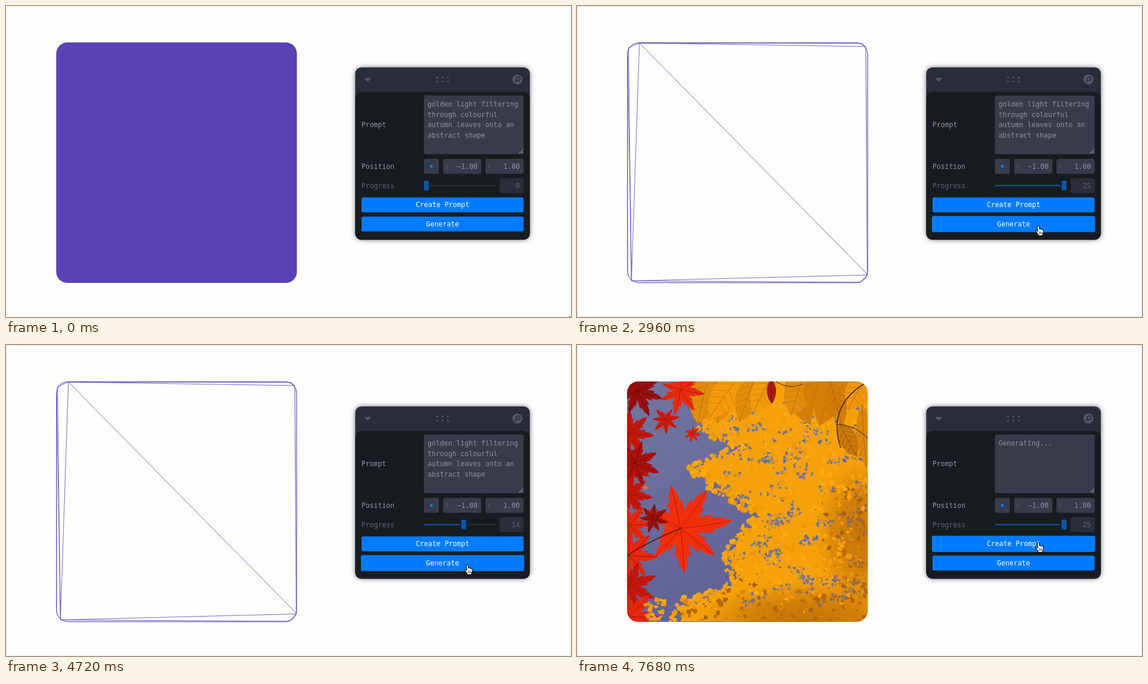
Animation, 960 px wide and 529 px high, one loop 8 s. Source, as an HTML page with a canvas:

```html
<!DOCTYPE html>
<html lang="en">
<head>
<meta charset="utf-8">
<title>Prompt panel</title>
<style>
  html, body { margin: 0; width: 100%; height: 100%; overflow: hidden; background: #fefefe; }
  #stage { position: absolute; left: 0; top: 0; width: 960px; height: 529px; overflow: hidden; }
  canvas { position: absolute; left: 85px; top: 62px; border-radius: 19px; }
  svg { position: absolute; left: 0; top: 0; }
  text { font: 11.64px "DejaVu Sans Mono", Menlo, monospace; fill: #8c92a4; white-space: pre; }
  .end { text-anchor: end; }
  .mid { text-anchor: middle; fill: #fefefe; }
  .tag { font-size: 9.5px; fill: #535760; }
  .field { fill: #383b49; }
  .grey { fill: #535760; }
  .blue { fill: #007bff; }
  .panel { filter: drop-shadow(0 0 4.5px rgba(0, 0, 0, .55)); }
</style>
</head>
<body>
<div id="stage">
  <canvas id="feathers" width="409" height="409"></canvas>
  <canvas id="leaves" width="409" height="409"></canvas>
  <svg width="960" height="529" viewBox="0 0 960 529">
    <rect id="frame" x=".5" y=".5" width="959" height="528" fill="none" stroke="#e5e5e5"/>
    <rect id="block" x="85.3" y="62" width="409" height="409" rx="19" fill="#5a42b5"/>
    <g id="wire" fill="none" stroke="#5146b0" stroke-width=".8">
      <rect x="85.5" y="62.3" width="408.6" height="408.6" rx="20"/>
      <rect x="86.3" y="63" width="406.8" height="407" rx="19" stroke-width=".6"/>
      <path d="M106 63L494 457" stroke="#4c4796"/>
      <path d="M106 63L92.5 467.5L493.5 457.5L481 470L92.5 467.5L87.5 71L106 63L490.5 69L493.5 457.5M106 63L484 63.5L490.5 69M86 85L92.5 467.5"/>
    </g>

    <rect class="panel" x="593.4" y="104.4" width="296.7" height="293.2" rx="10.5" fill="#292d39"/>
    <rect x="593.4" y="146" width="296.7" height="251.6" rx="10.5" fill="#181c20"/>
    <path class="grey" d="M610 122.2h9q1.6 .4 .6 1.8l-4 4q-1.1 .8-2.2 0l-4-4q-1-1.4 .6-1.8z"/>
    <g id="dots" class="grey"></g>
    <circle class="grey" cx="869" cy="125" r="8.6"/>
    <path d="M868 126L864.8 129.2" stroke="#292d39" stroke-width="2" stroke-linecap="round"/>
    <circle cx="870.3" cy="123.8" r="3.2" fill="none" stroke="#292d39" stroke-width="1.8"/>

    <text x="604" y="206.3">Prompt</text>
    <rect class="field" x="710" y="152.2" width="169.5" height="99.8" rx="3.2"/>
    <g id="prompt"></g>
    <path d="M872 251L878.6 244.4M876 251L878.6 248.4" stroke="#d5d6da" stroke-width=".9"/>

    <text x="604" y="276.8">Position</text>
    <rect class="field" x="710" y="260" width="25.4" height="25.4" rx="3.2"/>
    <circle class="blue" cx="722.6" cy="272.7" r="2.5"/>
    <rect class="field" x="742.6" y="260" width="65" height="25.4" rx="3.2"/>
    <rect class="field" x="814.7" y="260" width="64.8" height="25.4" rx="3.2"/>
    <text x="746" y="276" class="tag">X</text>
    <text x="818" y="276" class="tag">Y</text>
    <text x="801.2" y="276.8" class="end">−1.00</text>
    <text x="873" y="276.8" class="end">1.00</text>

    <g opacity=".6">
      <text x="604" y="309.8">Progress</text>
      <rect class="field" x="710" y="304.4" width="122" height="2.1" rx="1"/>
      <rect id="fill" class="blue" x="710" y="304.4" height="2.1" rx="1"/>
      <rect id="knob" class="blue" y="296" width="10.4" height="18.8" rx="3" stroke="#181c20" stroke-width="2"/>
      <rect class="field" x="838.8" y="292.8" width="40.7" height="25.4" rx="3.2"/>
      <text id="count" x="873" y="309.8" class="end"></text>
    </g>

    <rect id="create" class="blue" rx="3.2"/>
    <rect id="generate" class="blue" rx="3.2"/>
    <text x="741.7" y="342.4" class="mid">Create Prompt</text>
    <text x="741.7" y="375.3" class="mid">Generate</text>

    <g id="cursor">
      <g id="hand" stroke="#111" stroke-width="1.1" stroke-linejoin="round">
        <path fill="#fff" d="M-1.7 .2C-1.9-1.7 1-1.9 1.2 0L1.9 4.6C2.5 3.4 4.2 3.8 4.4 5C5.2 4 6.6 4.6 6.8 5.8C7.8 5.2 8.4 6 8.4 7L8.2 10.5L7 13.5V15.5H-.2V13.8L-3.6 9.6C-5.4 7.4-4.2 6-2.4 7.2L-1 8.6Z"/>
        <path d="M1.6 9.2V13M3.6 9.2V13M5.5 9.2V13" stroke-width=".8"/>
      </g>
      <path id="arrow" d="M0 0V14.5L3.3 11.5L5.5 16.6L7.8 15.6L5.6 10.7H10.2Z" fill="#000" stroke="#fff"/>
    </g>
  </svg>
</div>
<script>
const $ = id => document.getElementById(id);
const TAU = Math.PI * 2;
const clamp = v => Math.min(1, Math.max(0, v));
const smooth = v => (v = clamp(v), v * v * (3 - 2 * v));

let seed = 1;
const rnd = () => {
  seed = (seed * 16807) % 2147483647;
  return seed / 2147483647;
};
const span = (a, b) => a + rnd() * (b - a);
const pick = list => list[Math.floor(rnd() * list.length)];

function shape(c, color, pts) {
  c.beginPath();
  for (const [x, y] of pts) c.lineTo(x, y);
  c.closePath();
  c.fillStyle = color;
  c.fill();
}

function speck(c, x, y, r, color) {
  const pts = [];
  for (let a = 0; a < TAU; a += TAU / 7) {
    const d = r * span(.5, 1.3);
    pts.push([x + d * Math.cos(a), y + d * Math.sin(a)]);
  }
  shape(c, color, pts);
}

function soft(c, x, y, rx, ry, rgb, alpha = 1) {
  c.save();
  c.translate(x, y);
  c.scale(rx, ry);
  const g = c.createRadialGradient(0, 0, 0, 0, 0, 1);
  g.addColorStop(0, `rgba(${rgb},${alpha})`);
  g.addColorStop(.5, `rgba(${rgb},${alpha * .7})`);
  g.addColorStop(1, `rgba(${rgb},0)`);
  c.fillStyle = g;
  c.fillRect(-1, -1, 2, 2);
  c.restore();
}

function curve(c, color, width, x, y, cx, cy, x2, y2) {
  c.strokeStyle = color;
  c.lineWidth = width;
  c.beginPath();
  c.moveTo(x, y);
  c.quadraticCurveTo(cx, cy, x2, y2);
  c.stroke();
}

// Pointed leaf with ribs, growing from x,y along an angle.
function leaf(c, x, y, len, w, angle, color, rib) {
  c.save();
  c.translate(x, y);
  c.rotate(angle);
  c.beginPath();
  c.moveTo(0, 0);
  c.bezierCurveTo(len * .3, -w, len * .75, -w * .7, len, 0);
  c.bezierCurveTo(len * .75, w * .7, len * .3, w, 0, 0);
  c.fillStyle = color;
  c.fill();
  c.clip();
  curve(c, rib, .9, 0, 0, len / 2, 2, len, 0);
  for (let d = .1; d < .8; d += .14) for (const s of [-1, 1]) {
    curve(c, rib, .5, len * d, 0, len * (d + .1), s * w * .3, len * (d + .25), s * w);
  }
  c.restore();
}

// Seven toothed lobes around a centre, the longest along the angle.
function maple(c, x, y, r, angle, color, vein = '#8e1808') {
  const pts = [], tips = [];
  const at = (a, d) => [x + d * Math.cos(a), y + d * Math.sin(a)];
  for (let i = -3; i <= 3; i++) {
    const a = angle + i * .82;
    const len = r * (1 - .07 * Math.abs(i)) * span(.9, 1.05);
    for (const [turn, d] of [[-.41, .4], [-.27, .68], [-.2, .6], [-.12, .8], [0, 1], [.12, .8], [.2, .6], [.27, .68]]) {
      pts.push(at(a + turn, len * d));
    }
    tips.push(at(a, len * .95));
  }
  shape(c, color, pts);
  for (const [tx, ty] of tips) curve(c, vein, .8, x, y, (x + tx) / 2 + 2, (y + ty) / 2 + 2, tx, ty);
}

// Region between two height functions.
function band(c, color, low, high, rough = 0) {
  const a = [], b = [];
  for (let u = -4; u <= 214; u += 2) {
    a.push([u, low(u) + span(-rough, rough)]);
    b.unshift([u, high(u) + span(-rough, rough)]);
  }
  shape(c, color, a.concat(b));
}

const rim = u => 26 + 45 * Math.exp(-Math.abs(u) / 24) + 46 * smooth((u - 105) / 110);
const crest = u => 104 + 100 * Math.exp(-Math.abs(u) / 26) - 22 * smooth((u - 115) / 60);

// One quadrant, measured outwards from the mirror axes.
function feather(c) {
  seed = 77;
  c.fillStyle = '#4a250a';
  c.fillRect(0, 0, 212, 207);
  soft(c, 60, 195, 90, 32, '150,84,14', .8);
  soft(c, 150, 195, 60, 14, '150,50,14', .7);
  soft(c, 120, 172, 90, 18, '24,14,6', .85);
  soft(c, 165, 112, 85, 42, '14,10,5');
  soft(c, 150, 80, 40, 16, '66,78,24', .9);
  for (let i = 0; i < 260; i++) {
    const x = span(20, 215), y = span(95, 207) - x * .08;
    curve(c, pick(['#b87a10', '#7a3c0a', '#d59a18', '#1c0c04', '#2a1406', '#8a4a0c']), span(.4, 1.7),
      x * span(.2, .6), y + span(5, 30), x * .8, y + span(4, 18), x, y);
  }
  band(c, '#d6960f', rim, crest, 3);
  soft(c, 60, 60, 70, 45, '236,170,18', .6);
  soft(c, 150, 78, 50, 14, '90,60,10', .6);
  for (let i = 0; i < 380; i++) {
    const d = rnd(), x = span(25, 185);
    const low = rim(x), high = crest(x) + 18;
    curve(c, pick(['#9a5f0a', '#efb41c', '#6e400a', '#f0bd2a', '#c4810c', '#e0a010']), span(.4, 1.1),
      x * .12, 80 + d * 115, x * .45, low + d * 85 + 8, x, low + d * (high - low));
  }
  for (let i = 0; i < 60; i++) speck(c, span(62, 100), span(62, 96), span(.7, 2.2), pick(['#8c9d66', '#b5a24a', '#779078']));
  for (let u = 50; u < 205; u += 4) for (let k = 0; k < 4; k++) {
    speck(c, u + span(-2, 2), rim(u) + 3 + k * 4, 1, '#74430b');
  }
  leaf(c, 88, 106, 97, 32, Math.atan2(63, -72), '#8a1c14', '#5c100c');
  soft(c, 172, 148, 34, 17, '226,70,20', .9);
  for (let i = 0; i < 60; i++) {
    speck(c, 172 + span(-24, 24), 148 + span(-11, 11), span(1, 3), pick(['#ef5a18', '#d43a16', '#a83a12', '#f08a28']));
  }
  soft(c, 128, 142, 14, 9, '215,120,20', .9);

  band(c, '#b4b8dc', () => 0, rim, 1);
  for (let i = 0; i < 50; i++) {
    const x = span(150, 212);
    curve(c, pick(['#e6e6f4', '#8f92b8', '#d8daf0']), 1, 125, 28, x - 20, 32, x, span(30, rim(x)));
  }
  const slate = c.createLinearGradient(0, 9, 0, 38);
  slate.addColorStop(0, '#1b1d2b');
  slate.addColorStop(.4, '#3d4560');
  slate.addColorStop(1, '#717896');
  band(c, slate, () => 8, u => 12 + 17 * smooth((u - 10) / 60) + 5 * smooth((u - 110) / 90));
  soft(c, 0, 17, 52, 17, '240,120,150', .9);
  soft(c, 0, 10, 28, 15, '255,235,245', .9);
  leaf(c, 0, 60, 27, 30, Math.PI / 2, '#f67214', '#d85a10');
  band(c, '#b4b8dc', u => rim(u) - 16, u => rim(u) * (u < 14) + (rim(u) - 16) * (u >= 14));
  c.fillStyle = '#f0e8de';
  c.fillRect(0, 0, 212, 9);
  soft(c, 30, 0, 150, 10, '255,255,255');
  curve(c, '#c9b396', 1, 110, 6, 160, 1, 212, 6);
}

function paintFeathers() {
  const c = $('feathers').getContext('2d');
  for (const sx of [-1, 1]) for (const sy of [-1, 1]) {
    c.save();
    c.translate(199, 204);
    c.scale(sx, sy);
    c.beginPath();
    c.rect(0, 0, 212, 207);
    c.clip();
    feather(c);
    c.restore();
  }
}

// Left limit of the foliage at height y: a few bays and capes.
const SHORE = [[62, 205], [145, 212], [172, 268], [207, 192], [245, 232], [290, 306], [350, 256], [405, 268], [432, 182], [471, 165]];
function shore(y) {
  const i = Math.max(1, SHORE.findIndex(k => k[0] >= y));
  const [y0, x0] = SHORE[i - 1], [y1, x1] = SHORE[i];
  return x0 + (x1 - x0) * (y - y0) / (y1 - y0);
}

function paintLeaves() {
  const c = $('leaves').getContext('2d');
  seed = 4242;
  c.translate(-85, -62);
  const sky = c.createLinearGradient(85, 62, 300, 471);
  sky.addColorStop(0, '#74759f');
  sky.addColorStop(1, '#5d6096');
  c.fillStyle = sky;
  c.fillRect(85, 62, 409, 409);

  const gold = ['#f7a208', '#fba90c', '#ee970a', '#f4a00c'];
  const brown = ['#c87408', '#b86a08', '#d9840a', '#a8640a'];
  const mass = [[494, 471], [494, 62]];
  for (let y = 62; y <= 471; y += 3) mass.push([shore(y) + span(2, 18), y]);
  shape(c, '#f6a109', mass);
  for (let i = 0; i < 90; i++) {
    const y = span(95, 468), x = span(shore(y) + 5, 494);
    for (let k = 0; k < 9; k++) speck(c, x + span(-13, 13), y + span(-6, 6), span(1.2, 3.5), pick(['#6c6f98', '#7a7c8e']));
  }
  for (let y = 66; y < 470; y += 1.5) speck(c, shore(y) + span(-9, 16), y, span(2.5, 6), pick(gold));
  soft(c, 480, 320, 75, 125, '176,98,8', .7);
  soft(c, 390, 475, 190, 75, '168,94,8', .7);
  for (let i = 0; i < 900; i++) {
    const y = span(95, 471), x = span(shore(y), 494);
    const dark = Math.max(smooth((x - 400) / 90) * smooth((y - 220) / 60), smooth((y - 380) / 80));
    speck(c, x, y, span(1.5, 5), pick(rnd() < dark ? brown : gold));
  }

  for (let x = 225; x < 500; x += 27) {
    leaf(c, x, 48, span(60, 95), span(30, 40), span(1.1, 2.2), pick(['#e08c0c', '#ee970c', '#d67f07', '#f29b0a']), '#b8700c');
  }
  leaf(c, 330, 58, 42, 12, 1.55, '#a81a10', '#7c120c');
  leaf(c, 430, 60, 80, 26, 1.3, '#d27c08', '#a8660c');
  leaf(c, 446, 132, 65, 24, 1.1, '#c87808', '#8a5208');
  leaf(c, 484, 100, 110, 20, 1.5, '#dc880a', '#a8660c');
  curve(c, '#4a2a0c', 1.6, 488, 66, 425, 105, 448, 175);
  curve(c, '#4a2a0c', 1.2, 440, 135, 470, 135, 494, 158);
  curve(c, '#6b3c0c', 1.2, 335, 60, 360, 78, 384, 66);

  const reds = ['#e8260c', '#d81c0a', '#c4160a', '#ee2a0c'];
  for (let y = 150; y < 480; y += 52) maple(c, 88, y, span(40, 56), span(-.4, .4), pick(reds));
  maple(c, 176, 76, 46, 1, '#ea2a0e');
  maple(c, 102, 78, 50, .3, '#970e0a', '#5c0808');
  maple(c, 150, 126, 28, 1.5, '#d41a0a');
  maple(c, 196, 150, 16, 1, '#e8220a');
  maple(c, 98, 200, 44, .4, '#a81008', '#6a0a08');
  maple(c, 176, 312, 86, -.15, '#f22e0c');
  maple(c, 128, 296, 30, -.6, '#9c1008', '#5c0808');
  curve(c, '#5c100a', 1.4, 85, 358, 120, 335, 176, 312);
  soft(c, 116, 242, 5, 5, '255,110,30');
  for (let i = 0; i < 30; i++) speck(c, span(115, 150), span(432, 468), span(2, 5), pick(gold));
}

const LINES = ['golden light filtering', 'through colourful', 'autumn leaves onto an', 'abstract shape'];
const svgRow = (s, i) => `<text x="716.3" y="${171.3 + i * 17.5}">${s}</text>`;
const promptRows = LINES.map(svgRow).join('');
const busyRow = svgRow('Generating...', 0);

const LOOP = 8000;
const WIRE1 = 1240, PIC1 = 3000, WIRE2 = 3760, PIC2 = 5720, ASK = 6560;
const MOVES = [[40, 957, 526], [840, 712, 338], [1080, 784, 375], [5960, 784, 375], [6400, 784, 337]];

// Steps 1 to 24 run evenly, the last one lags.
function progress(t, last) {
  if (t >= last + 240) return 25;
  return Math.min(24, Math.max(0, 24 - Math.round((last - t) / 46)));
}

function pointer(t) {
  let [, x, y] = MOVES[0];
  for (let i = 1; i < MOVES.length; i++) {
    const [t0] = MOVES[i - 1], [t1, x1, y1] = MOVES[i];
    const e = smooth((t - t0) / (t1 - t0));
    x += (x1 - x) * e;
    y += (y1 - y) * e;
  }
  return [x, y];
}

const show = (id, on) => { $(id).style.display = on ? '' : 'none'; };
const set = (id, attrs) => { for (const k in attrs) $(id).setAttribute(k, attrs[k]); };

function button(id, y, focus) {
  const o = focus ? 1 : 0;
  set(id, { x: 604 - o, y: y - o, width: 275.5 + 2 * o, height: 25.4 + 2 * o });
}

let busy = null;
function draw(t) {
  show('frame', t >= 40);
  show('block', t < WIRE1);
  show('wire', (t >= WIRE1 && t < PIC1) || (t >= WIRE2 && t < PIC2));
  show('feathers', t >= PIC1 && t < WIRE2);
  show('leaves', t >= PIC2);

  const n = progress(t, t < WIRE2 ? 2480 : 5160);
  const x = 710 + n / 25 * 113.4;
  set('knob', { x: x - 1 });
  set('fill', { width: x - 709 });
  $('count').textContent = n;

  button('create', 325.5, t >= ASK);
  button('generate', 358.2, t >= WIRE1 && t < ASK);
  if (busy !== (t >= ASK)) {
    busy = t >= ASK;
    $('prompt').innerHTML = busy ? busyRow : promptRows;
  }

  const [px, py] = pointer(t);
  const over = px > 604 && px < 880 && py > 325 && py < 384;
  show('hand', over);
  show('arrow', !over);
  set('cursor', { transform: `translate(${px} ${py})` });
}

for (const y of [121.6, 128.6]) for (const x of [732.5, 741.6, 750.7]) {
  $('dots').innerHTML += `<circle cx="${x}" cy="${y}" r="1.6"/>`;
}
paintFeathers();
paintLeaves();

const begin = performance.now();
function tick() {
  draw((performance.now() - begin) % LOOP);
  requestAnimationFrame(tick);
}
draw(0);
requestAnimationFrame(tick);
</script>
</body>
</html>
```
